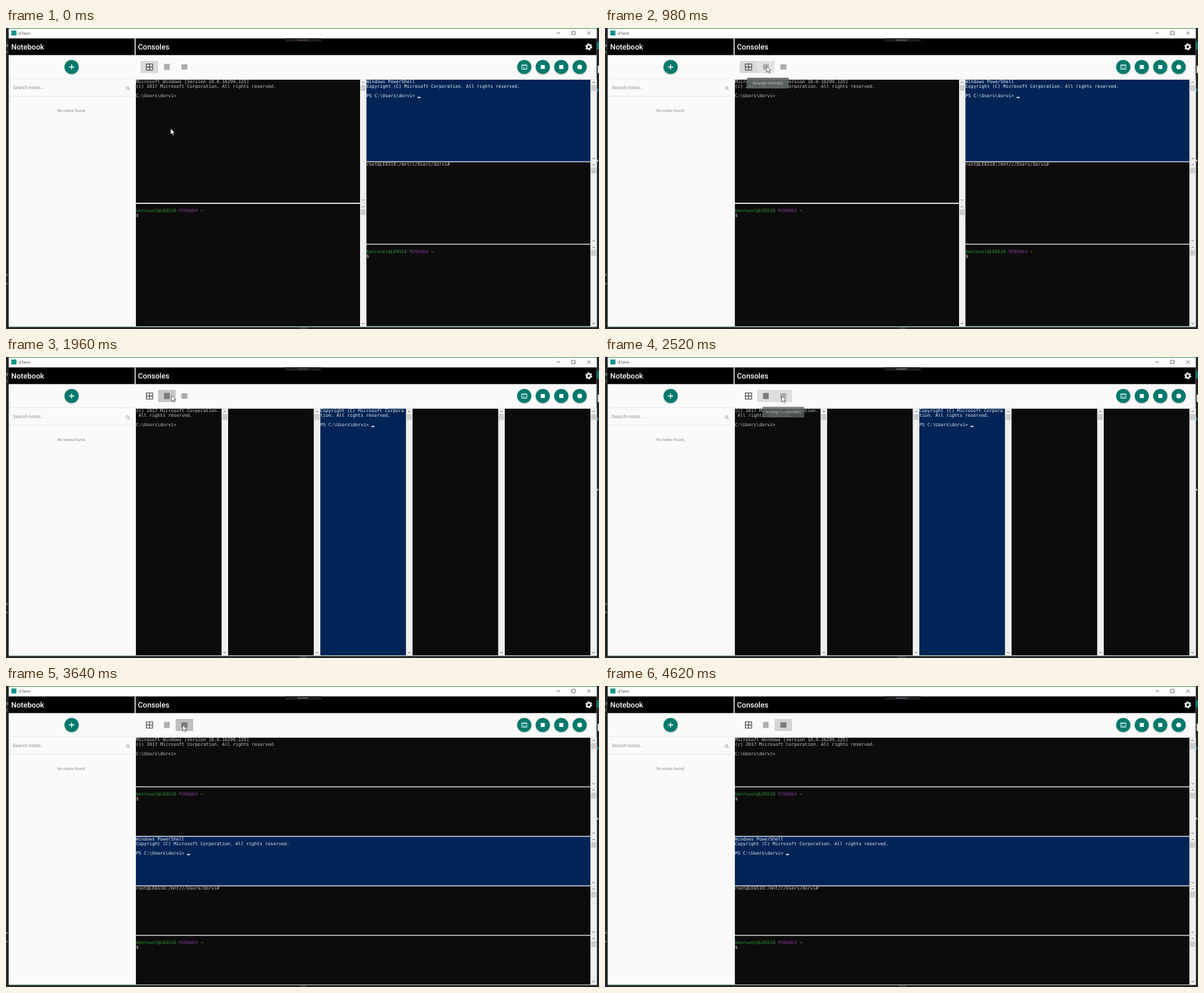
Animation of 881x448 px, one loop 5400 ms. Source, as an HTML page:

```html
<!DOCTYPE html>
<html lang="en">
<head>
<meta charset="utf-8">
<title>dTerm</title>
<style>
  html, body { margin: 0; width: 100%; height: 100%; overflow: hidden; background: #232528; }
  svg { display: block; width: 881px; height: 448px; }
  text { white-space: pre; text-rendering: geometricPrecision; font-family: Roboto, sans-serif; }
  .mono { font: 6.65px "DejaVu Sans Mono", monospace; }
</style>
</head>
<body>
<svg id="stage" viewBox="0 0 881 448" xmlns="http://www.w3.org/2000/svg"></svg>
<script>
const LOOP = 5400;
const stage = document.getElementById("stage");

function add(tag, attrs, parent = stage) {
  const el = document.createElementNS(stage.namespaceURI, tag);
  for (const k in attrs) el.setAttribute(k, attrs[k]);
  parent.append(el);
  return el;
}
const rect = (x, y, width, height, fill, parent) => add("rect", { x, y, width, height, fill }, parent);
const stroke = (d, color, w, parent) =>
  add("path", { d, fill: "none", stroke: color, "stroke-width": w }, parent);
function label(str, x, y, size, fill, extra = {}, parent = stage) {
  const el = add("text", { x, y, "font-size": size, fill, ...extra }, parent);
  el.textContent = str;
  return el;
}

// Window frame and the desktop showing around it
function drawFrame() {
  rect(0, 0, 881, 448, "#232528");
  for (const [s, y] of [["g", 27], ["t", 38], ["x", 369], ["v", 382]]) label(s, 0, y, 6, "#aeb2b5");
  rect(878, 21, 3, 11, "#08796e");
  rect(879, 56, 2, 11, "#d8d8d8");
  rect(878, 90, 2, 5, "#2f6d8c");
  rect(878, 196, 2, 3, "#a5a5a5");
  rect(436, 445.5, 11, 2, "#45484b");
  rect(4, 0, 873.5, 445, "#fafafa");
  rect(4, 0, 873.5, 1, "#4f9a5b");
  rect(4, 444.2, 873.5, 1, "#8fb795");
  rect(4, 1, 873.5, 14.5, "#ffffff");
  rect(8, 3.7, 7.5, 7.5, "#16948a");
  label("dTerm", 19, 10, 6, "#555", { "font-family": "Open Sans, sans-serif" });
  stroke("M818 7.5h5", "#555", 0.8);
  stroke("M840.5 5h5v5h-5z", "#555", 0.8);
  stroke("M863.5 5l5 5m0-5l-5 5", "#555", 0.8);

  rect(4, 15.5, 873.5, 24.8, "#000");
  rect(191, 15.5, 1.6, 25, "#e6e6e6");
  label("Notebook", 7.7, 32, 11.2, "#fff", { "font-weight": 500 });
  label("Consoles", 196, 32, 11.2, "#fff", { "font-weight": 500 });
  rect(415, 15.5, 54, 5, "#1d1a1b");

  add("circle", { cx: 865.8, cy: 28, r: 2.9, fill: "none", stroke: "#fff", "stroke-width": 2 });
  add("circle", { cx: 865.8, cy: 28, r: 4.4, fill: "none", stroke: "#fff", "stroke-width": 1.5, "stroke-dasharray": "2.3 2.308" });
}

function drawNotebook() {
  rect(4, 75, 188, 0.8, "#e9e9e9");
  rect(4, 101, 188, 0.8, "#e6e6e6");
  label("Search notes...", 10.3, 91, 7.1, "#8f8f8f");
  add("circle", { cx: 180.6, cy: 89.3, r: 1.9, fill: "none", stroke: "#888", "stroke-width": 0.8 });
  stroke("M182 90.8l2 2", "#888", 0.9);
  label("No notes found.", 97.5, 124.5, 6, "#8c8c8c", { "text-anchor": "middle" });
}

function roundButton(cx) {
  add("circle", { cx, cy: 59, r: 11.2, fill: "#000", opacity: 0.12 });
  add("circle", { cx, cy: 58, r: 10.6, fill: "#00796b" });
}

function drawButtons() {
  [97.5, 770, 797.5, 825, 852.3].forEach(roundButton);
  stroke("M93.7 58h7.6M97.5 54.2v7.6", "#fff", 1.3);
  stroke("M766.2 55h7.6v6.4h-7.6zM766.2 55.6h7.6M768 57.6l1.3 1.2l-1.3 1.2M770.2 60h2", "#fff", 0.9);
  rect(794.5, 55, 6, 6, "#fff");
  rect(822, 55, 6, 6, "#fff");
  add("circle", { cx: 852.3, cy: 58, r: 3.6, fill: "#fff" });
}

// Console contents: each line is a list of [text, colour] runs
const GREY = "#c9c9c9", PALE = "#eeedf0";
const plain = (lines, color) => lines.map(s => [[s, color]]);
const rights = "Microsoft Corporation. All rights reserved.";
const cmd = { bg: "#0c0c0c", lines: plain(["Microsoft Windows [Version 10.0.16299.125]", "(c) 2017 " + rights, "", "C:\\Users\\dorvi>"], GREY) };
const shell = { bg: "#012456", caret: 3, lines: plain(["Windows PowerShell", "Copyright (C) " + rights, "", "PS C:\\Users\\dorvi>"], PALE) };
const root = { bg: "#0c0c0c", lines: plain(["root@LE6510:/mnt/c/Users/dorvi#"], GREY) };
const bash = { bg: "#0c0c0c", lines: [[], [["benruvol@LE6510 ", "#2f9a35"], ["MINGW64 ", "#793a86"], ["~", "#b5b58a"]], [["$", GREY]]] };
const blank = { bg: "#0c0c0c", lines: [] };
const cmdThin = { ...cmd, lines: plain(["(c) 2017 Microsoft Corporation.", " All rights reserved.", "", "C:\\Users\\dorvi>"], GREY) };
const shellThin = { ...shell, lines: plain(["Copyright (C) Microsoft Corpora", "tion. All rights reserved.", "", "PS C:\\Users\\dorvi>"], PALE) };

function pane(parent, con, x, y, w, h) {
  rect(x, y, w, h, con.bg, parent);
  con.lines.forEach((runs, i) => {
    const t = add("text", { x, y: y + 5.2 + i * 7, class: "mono" }, parent);
    for (const [s, fill] of runs) add("tspan", { fill }, t).textContent = s;
  });
  if (con.caret) rect(x + 76, y + 4.6 + con.caret * 7, 4.4, 1.6, "#f4f4f4", parent);
  const sx = x + w, mid = sx + 4.6;
  rect(sx, y, 9, h, "#f0f0f0", parent);
  rect(sx + 0.8, y + 8, 7.6, 8.6, "#cdcdcd", parent);
  stroke(`M${mid - 1.8} ${y + 5}l1.8-1.8l1.8 1.8M${mid - 1.8} ${y + h - 5}l1.8 1.8l1.8-1.8`, "#555", 0.9, parent);
}

function drawLayouts() {
  const groups = ["grid", "cols", "rows"].map(() => {
    const g = add("g");
    rect(192.5, 76, 685, 368.4, "#e8e8e8", g);
    return g;
  });
  const [grid, cols, rows] = groups;
  pane(grid, cmd, 193, 77, 333, 183);
  pane(grid, bash, 193, 261.8, 333, 182.2);
  [shell, root, bash].forEach((c, i) => pane(grid, c, 535.5, 77 + i * 122.7, 333, 121.4));
  [cmdThin, blank, shellThin, blank, blank].forEach((c, i) => pane(cols, c, 193 + i * 137, 77, 127.5, 367));
  [cmd, bash, shell, root, bash].forEach((c, i) => pane(rows, c, 193, 77 + i * 73.7, 675.5, 72.4));
  return groups;
}

drawFrame();
drawNotebook();
const backs = [200, 226, 252].map(x => rect(x, 49, 26, 18, "none"));
stroke("M208.5 53.5h9.4v9.2h-9.4zM213.2 53.5v9.2M208.5 58.1h9.4", "#4a4a4a", 1.1);
const icons = [null, rect(234.8, 53.5, 8.4, 9, "#aaa"), rect(260.5, 54, 9, 8, "#aaa")];
drawButtons();
const layouts = drawLayouts();
const tips = [["Arrange vertically", 242], ["Arrange horizontally", 265]].map(([s, x]) => {
  const g = add("g");
  add("rect", { x: x - 31, y: 74, width: 62, height: 16, rx: 1, fill: "#616866" }, g);
  label(s, x, 84.4, 5.9, "#d5d9d7", { "text-anchor": "middle" }, g);
  return g;
});
const pill = rect(433, 17.4, 16, 1.2, "#777");
const pointer = add("path", {
  d: "M0 0V9L2.1 7.1L3.6 10.4L5.1 9.7L3.6 6.5H6.4Z",
  fill: "#fff", stroke: "#222", "stroke-width": 0.6
});

// Tracks: [start ms, values...], each held until the next entry
const cursorTrack = [
  [0, 244.5, 149.5], [280, 244.5, 147], [420, 245, 138], [560, 243.5, 122], [700, 242.5, 104.5],
  [840, 241, 78], [980, 240, 57], [1960, 246, 57], [2100, 254, 57.5], [2240, 262.5, 58],
  [4200, 266, 50], [4340, 275, 36], [4480, 292, 14], [4620, -30, -30]
];
const layoutTrack = [[0, 0], [1400, 1], [2940, 2]];
const backTracks = [
  [[0, "#d9d9d9"], [1400, "none"]],
  [[0, "none"], [980, "#e2e2e2"], [1400, "#c4c4c4"], [1540, "#b8b8b8"], [1680, "#c0c0c0"], [1820, "#c8c8c8"], [2100, "#dedede"], [2940, "none"]],
  [[0, "none"], [2240, "#e4e4e4"], [2520, "#dedede"], [2800, "#d0d0d0"], [2940, "#a09c9a"], [3220, "#b2b0af"], [3360, "#bfbfbf"], [4200, "#d4d4d4"]]
];
const tipTracks = [
  [[0, 0], [980, 0.9], [1400, 0.25], [1540, 0]],
  [[0, 0], [2520, 0.75], [2660, 0.9], [2940, 0]]
];
const pillTrack = [[0, "#6d3f7c"], [280, "#777"], [1400, "#5e4a40"], [2520, "#8a8a8a"], [2940, "#8c4a3c"], [3640, "#6f8560"], [4620, "#62778c"]];

const at = (track, t) => track.findLast(k => k[0] <= t).slice(1);

function draw(t) {
  const [x, y] = at(cursorTrack, t);
  const [mode] = at(layoutTrack, t);
  pointer.setAttribute("transform", `translate(${x} ${y})`);
  layouts.forEach((g, i) => g.setAttribute("display", i === mode ? "inline" : "none"));
  backs.forEach((b, i) => b.setAttribute("fill", at(backTracks[i], t)[0]));
  icons.forEach((el, i) => el && el.setAttribute("fill", i === mode ? "#7a7a7a" : "#adadad"));
  tips.forEach((g, i) => g.setAttribute("opacity", at(tipTracks[i], t)[0]));
  pill.setAttribute("fill", at(pillTrack, t)[0]);
}

const start = performance.now();
function tick() {
  draw((performance.now() - start) % LOOP);
  requestAnimationFrame(tick);
}
tick();
</script>
</body>
</html>
```
